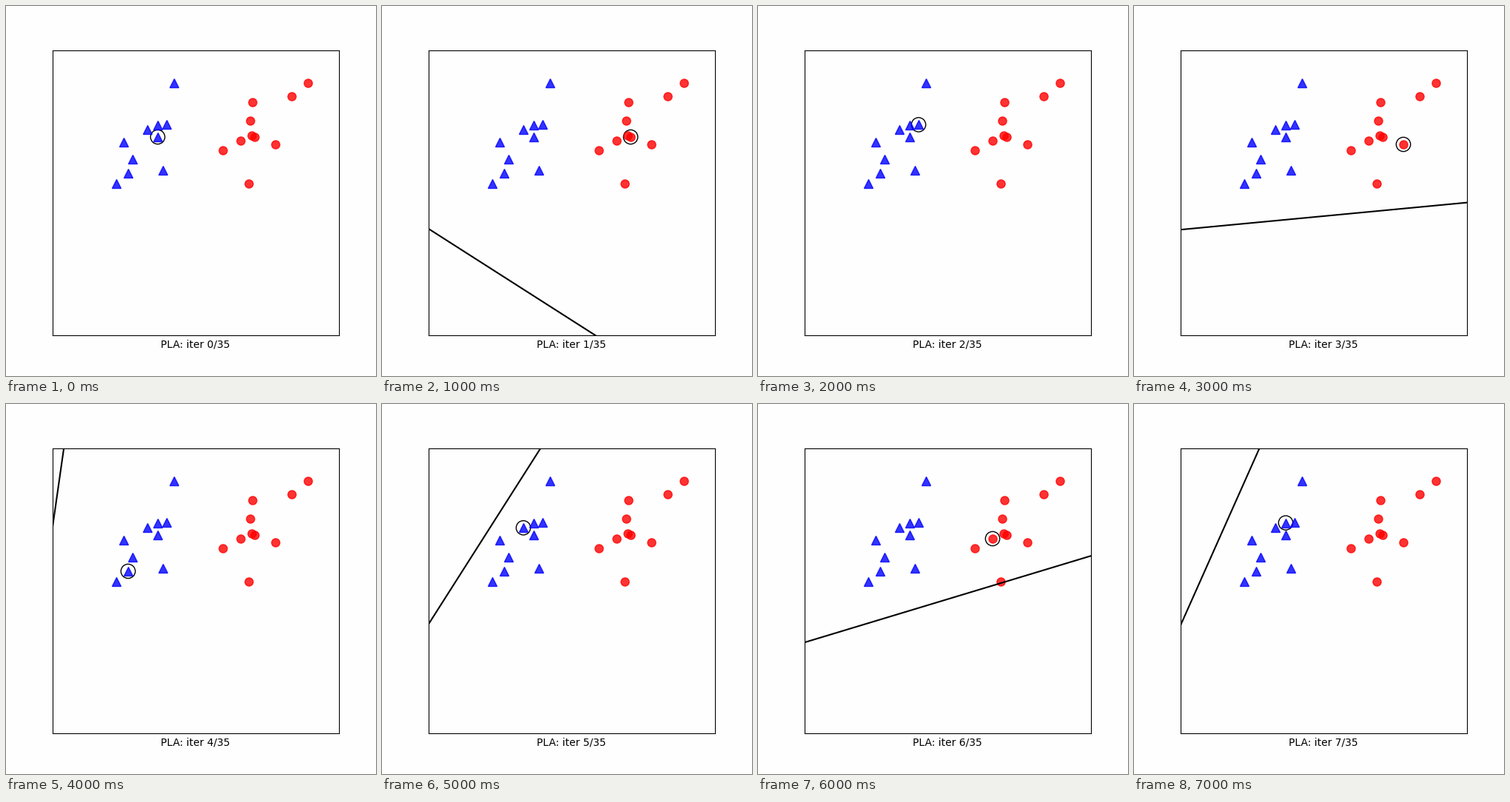
A matplotlib script for the animation above (8 s loop, 500x500 px).

```python
import numpy as np
import matplotlib.pyplot as plt
from matplotlib.animation import FuncAnimation

SIZE, DPI = 500, 100
TOTAL = 35      # updates until convergence
SHOWN = 8       # iterations in one loop
PAPER = '#fefefe'

fig, ax = plt.subplots(figsize=(SIZE / DPI, SIZE / DPI), dpi=DPI,
                       facecolor=PAPER)
ax.set_facecolor(PAPER)

# Scatter centres in stage pixels, in the order the learner visits them
centres = np.array([
    (205, 177), (336, 177), (217, 160.4), (364, 187), (165, 226),
    (191, 167.3), (317, 182), (205, 160.6), (227, 104), (159, 184),
    (171, 207), (149, 240), (212, 222), (408, 104), (386, 122),
    (333, 130), (330, 155), (332, 175), (293, 195), (328, 240)])

# Plot units: x in 0..6, y in -2..4
points = (centres - (62.5, 445)) * (6 / 387.5, -6 / 385) + (0, -2)
labels = np.where(points[:, 0] < 3, 1, -1)


def perceptron(w):
    """Yield each line's weights with the misclassified point that moves it."""
    for point, label in zip(points, labels):
        x = np.r_[1, point]
        if label * (w @ x) < 0:
            yield w, point
            w = w + label * x


steps = list(perceptron(np.array([-1.61, -0.623, 0.286])))


def update(i):
    ax.clear()
    ax.plot(*points[labels > 0].T, 'b^', markersize=8, alpha=0.8)
    ax.plot(*points[labels < 0].T, 'ro', markersize=8, alpha=0.8)

    (w0, w1, w2), point = steps[i]
    x = np.array([-100, 100])
    ax.plot(x, -(w1 * x + w0) / w2, 'k')
    ax.add_artist(plt.Circle(point, 0.15, color='k', fill=False))

    ax.axis([0, 6, -2, 4])
    ax.set_xticks([])
    ax.set_yticks([])
    ax.set_xlabel(f'PLA: iter {i}/{TOTAL}')
    return ax.get_children()


anim = FuncAnimation(fig, update, frames=SHOWN, interval=1000,
                     repeat=True, repeat_delay=0)
plt.show()
```
